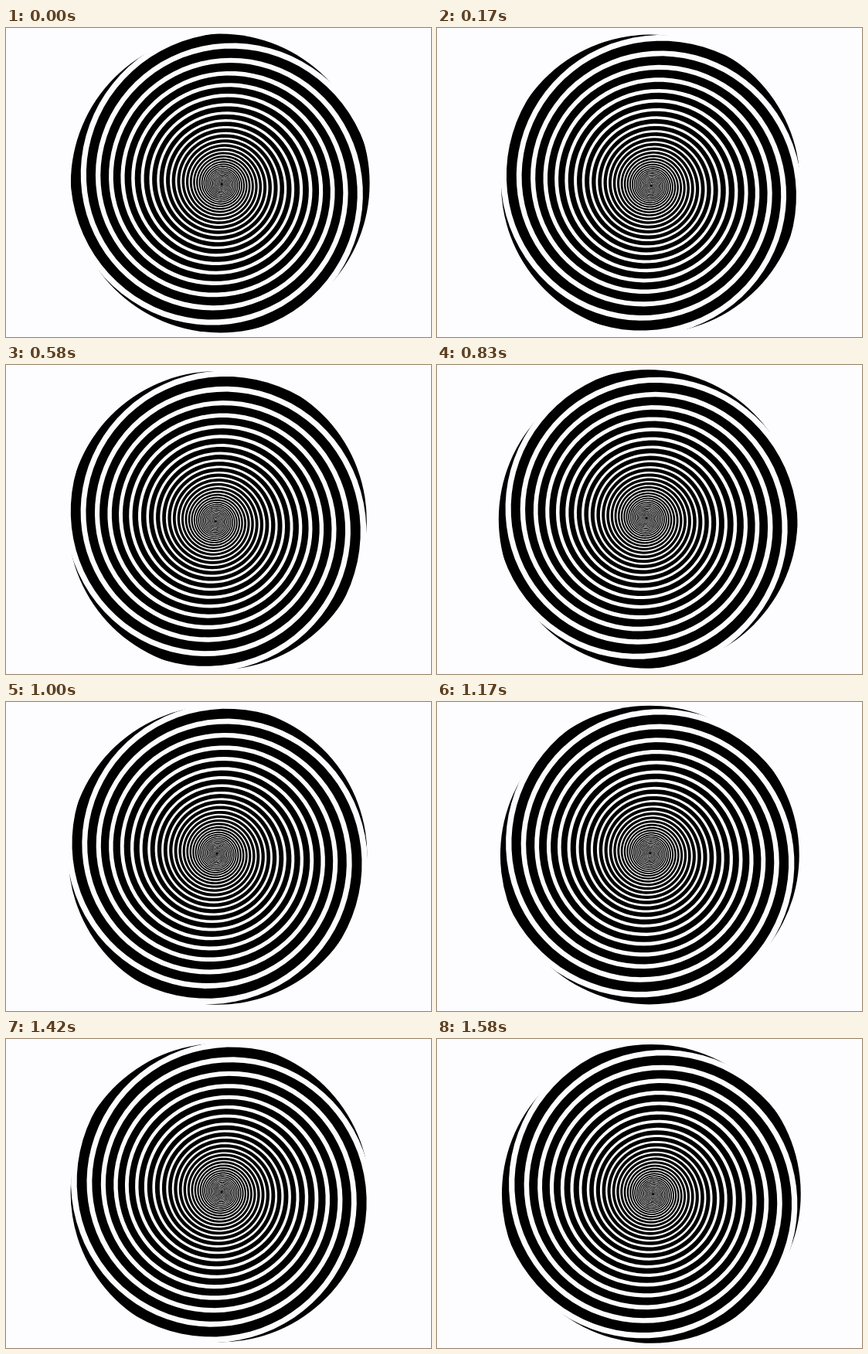
Animation, 550 px wide and 400 px high, one loop 1.66 s. Source, as an HTML page:

```html
<!DOCTYPE html>
<html lang="en">
<head>
<meta charset="utf-8">
<title>Spinning spiral</title>
<style>
  html, body { margin: 0; width: 100%; height: 100%; overflow: hidden; background: #fdfdff; }
  svg { display: block; width: 550px; height: 400px; }
</style>
</head>
<body>
<svg viewBox="0 0 550 400">
  <g id="wheel">
    <circle cx="277.2" cy="201" r="193.4"/>
    <path id="arms" fill="#fdfdff"/>
  </g>
</svg>
<script>
const LOOP = 1660, STEPS = 20;
const PIVOT = [275.2, 200.2];
const HUB = [279.3, 202.1];
const ARMS = 4;
const GROWTH = 0.0706;          // logarithmic spiral: r = exp(GROWTH * angle)
const PHASE = 6 * Math.PI / 180;
const BAND = 0.36;              // light share of each arm's period
const INNER = Math.exp(-GROWTH * BAND * 2 * Math.PI / ARMS);

function point(a, turn, scale) {
  const r = Math.exp(GROWTH * a) * scale, t = a + turn;
  return (HUB[0] + r * Math.cos(t)).toFixed(2) + ' ' + (HUB[1] + r * Math.sin(t)).toFixed(2);
}

function arm(k) {
  const turn = PHASE + k * 2 * Math.PI / ARMS;
  const from = Math.log(1.5) / GROWTH, to = Math.log(222) / GROWTH;
  const outer = [], inner = [];
  for (let a = from; a < to; a += 0.08) {
    outer.push(point(a, turn, 1));
    inner.unshift(point(a, turn, INNER));
  }
  return 'M' + outer.concat(inner).join('L') + 'Z';
}

const wheel = document.getElementById('wheel');
document.getElementById('arms').setAttribute('d',
  Array.from({ length: ARMS }, (_, k) => arm(k)).join(''));

// The wheel advances in equal ticks, timed to hundredths of a second.
function draw(ms) {
  const t = Math.floor((ms % LOOP) / 10) * 10;
  const step = Math.floor((t + 3.4) / (250 / 3));
  wheel.setAttribute('transform', `rotate(${step * 360 / STEPS} ${PIVOT})`);
}

const start = performance.now();
function tick() {
  draw(performance.now() - start);
  requestAnimationFrame(tick);
}
tick();
</script>
</body>
</html>
```
